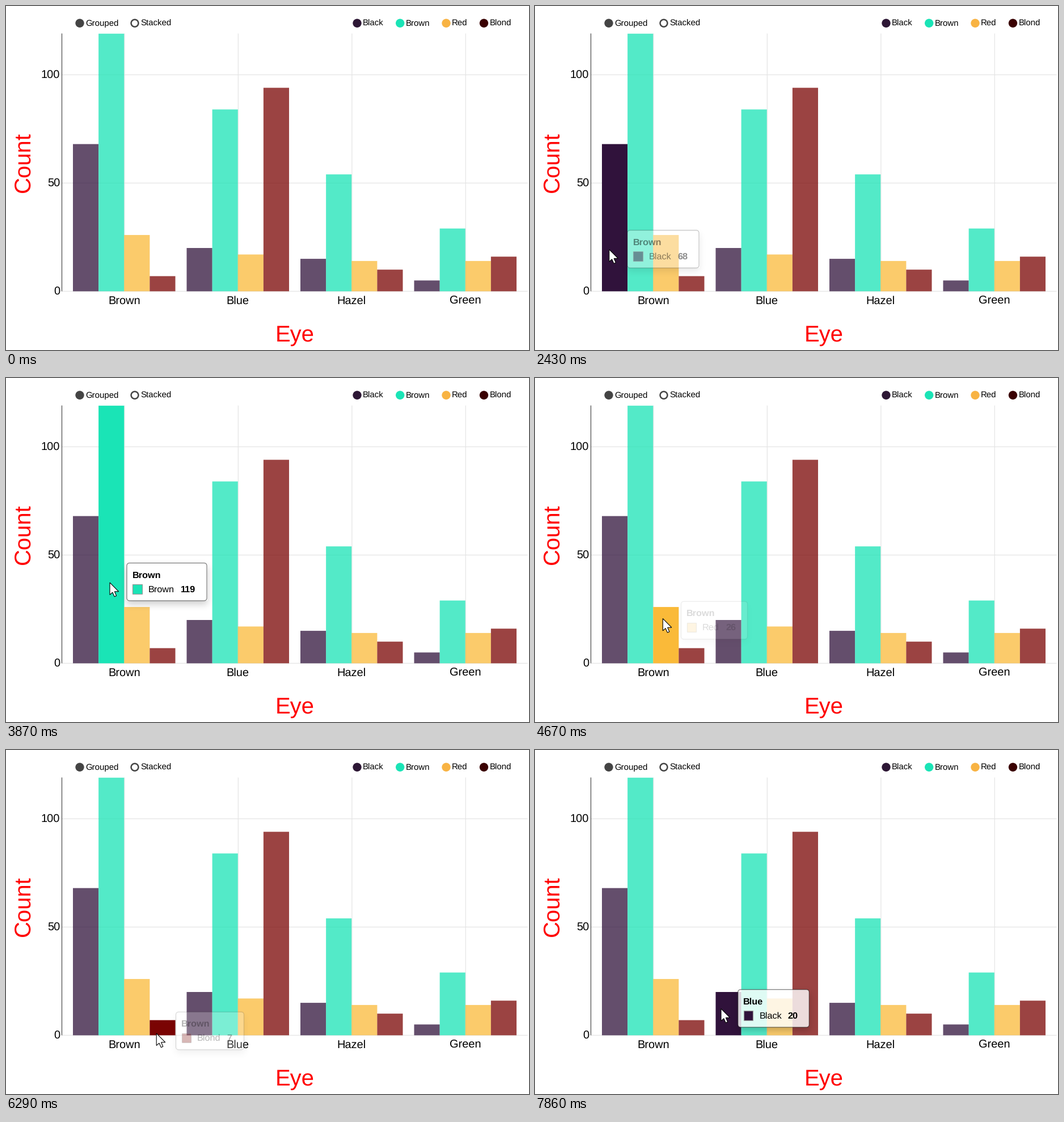
Recreate the animation shown at these times as a matplotlib script. Size 922x607 px, loop 8000 ms.

```python
import math

import matplotlib.pyplot as plt
import numpy as np
from matplotlib.animation import FuncAnimation
from matplotlib.patches import Circle, FancyBboxPatch, Polygon, Rectangle

W, H, DPI = 922, 607, 100
LOOP, INTERVAL, TICK = 8000, 40, 70
PT = 72 / DPI  # points per pixel

plt.rcParams["font.family"] = "Liberation Sans"
plt.rcParams["text.hinting"] = "none"

HAIR = ["Black", "Brown", "Red", "Blond"]
COLORS = ["#30123b", "#1ae4b6", "#faba39", "#7a0403"]
KEY_COLORS = ["#2d1735", "#1ae4b6", "#f8b343", "#3a0102"]
EYES = ["Brown", "Blue", "Hazel", "Green"]
COUNTS = [[68, 119, 26, 7], [20, 84, 17, 94], [15, 54, 14, 10], [5, 29, 14, 16]]

LEFT, RIGHT, TOP, BASE = 98.5, 919.5, 48.5, 503.4
UNIT = 3.82                      # pixels per count
GROUP_X, GROUP_STEP, BAR_W = 118, 200.5, 45.13
REST = 0.75                      # bar opacity when not hovered

fig = plt.figure(figsize=(W / DPI, H / DPI), dpi=DPI, facecolor="white")
ax = fig.add_axes([0, 0, 1, 1])
ax.set_xlim(0, W)
ax.set_ylim(H, 0)
ax.set_autoscale_on(False)
ax.axis("off")


def label(x, y, s, px, **kw):
    kw.setdefault("color", "black")
    return ax.text(x, y, s, fontsize=px * PT, va="baseline", **kw)


def line(x0, y0, x1, y1, color="#e5e5e5", z=1):
    ax.plot([x0, x1], [y0, y1], color=color, lw=1.25 * PT, zorder=z,
            solid_capstyle="butt", snap=False)


def draw_axes():
    for value in (0, 50, 100):
        y = BASE - value * UNIT
        line(LEFT, y, RIGHT, y)
        label(95, round(y) + 7, str(value), 20, ha="right")
    for i, eye in enumerate(EYES):
        x = GROUP_X + i * GROUP_STEP + 2 * BAR_W
        line(x + 0.6, TOP, x + 0.6, BASE)
        label(x, 526, eye, 20, ha="center")
    line(LEFT, TOP, LEFT, BASE, "#4d4d4d", 3)
    label(509.5, 592, "Eye", 40, ha="center", color="red")
    label(43, 275.5, "Count", 40, ha="center", color="red",
          rotation=90, rotation_mode="anchor")


def draw_bars():
    bars = {}
    for g, row in enumerate(COUNTS):
        for s, n in enumerate(row):
            x = GROUP_X + g * GROUP_STEP + s * BAR_W
            bars[g, s] = ax.add_patch(Rectangle(
                (x, BASE - n * UNIT), BAR_W, n * UNIT, fc=COLORS[s],
                alpha=REST, lw=0, zorder=2, snap=False))
    return bars


def draw_legend():
    def entry(x, name, color, fill=True):
        ax.add_patch(Circle((x, 30.3), 6.4, fc=color if fill else "white",
                            ec=color, lw=2.5 * PT, zorder=3))
        label(x + 10, 35, name, 15)

    entry(130, "Grouped", "#444444")
    entry(227, "Stacked", "#444444", fill=False)
    for x, name, color in zip((619, 694.7, 776, 842.5), HAIR, KEY_COLORS):
        entry(x, name, color)


def shadow_image(x, y, w, h, drop=6.25, sigma=6.25, pad=26):
    """Soft drop shadow around a box, cut out where the box itself lies."""
    x0, y0 = math.floor(x - pad), math.floor(y - pad)
    px = np.arange(x0, x0 + int(w) + 2 * pad + 2) + 0.5
    py = np.arange(y0, y0 + int(h) + 2 * pad + 2) + 0.5
    erf = np.vectorize(math.erf)

    def profile(p, a, b):
        k = sigma * math.sqrt(2)
        return (erf((p - a) / k) - erf((p - b) / k)) / 2

    rgba = np.zeros((len(py), len(px), 4))
    rgba[..., 3] = 0.2 * np.outer(profile(py, y + drop, y + h + drop),
                                  profile(px, x, x + w))
    inside = np.outer((py > y) & (py < y + h), (px > x) & (px < x + w))
    rgba[inside, 3] = 0
    return ax.imshow(rgba, extent=(x0, x0 + len(px), y0 + len(py), y0),
                     interpolation="nearest", aspect="auto", zorder=5)


class Tooltip:
    HEIGHT = 66.5

    def __init__(self, bar, x, y, w, value_x, show, full, hide):
        g, s = bar
        self.show, self.hide = show, hide
        self.ticks = (full - show) // TICK + 1
        self.shadow = shadow_image(x, y, w, self.HEIGHT)
        self.box = ax.add_patch(FancyBboxPatch(
            (x, y), w, self.HEIGHT, zorder=6, lw=1.25 * PT,
            boxstyle="round,pad=0,rounding_size=5"))
        swatch = ax.add_patch(Rectangle(
            (x + 10, y + 37.5), 16.5, 16.5, fc=COLORS[s], ec="#999999",
            lw=1.25 * PT, zorder=7))
        texts = [
            label(x + 9.5, y + 26, EYES[g], 16.25, weight="bold", zorder=7),
            label(x + 37.5, y + 51, HAIR[s], 16.25, zorder=7),
            label(x + value_x, y + 51, str(COUNTS[g][s]), 16.25,
                  weight="bold", zorder=7)]
        self.solid = [swatch, self.shadow] + texts

    def opacity(self, t):
        if t < self.show:
            return 0
        if t >= self.hide:
            return max(0, 1 - ((t - self.hide) // TICK + 1) / 3)
        return min(1, ((t - self.show) // TICK + 1) / self.ticks)

    def update(self, t):
        a = self.opacity(t)
        for part in self.solid:
            part.set_alpha(a)
            part.set_visible(a > 0)
        self.box.set_visible(a > 0)
        self.box.set_facecolor((1, 1, 1, 0.82 * a))
        self.box.set_edgecolor((0, 0, 0, 0.5 * a))


draw_axes()
bars = draw_bars()
draw_legend()

# bar, left, top, width, value offset, fade-in start and end, fade-out start
tooltips = [
    Tooltip((0, 0), 163, 395.7, 126, 88, 2220, 2780, 3380),
    Tooltip((0, 1), 213, 326.5, 141, 95, 3520, 3870, 4530),
    Tooltip((0, 2), 257.5, 394.3, 117, 78.5, 4670, 5090, 6080),
    Tooltip((0, 3), 299.5, 462.3, 120, 89.5, 6220, 6640, 7370),
    Tooltip((1, 0), 357.8, 422.7, 125.5, 87.5, 7510, 7860, LOOP),
]

# time at which the highlighted bar changes
HOVERS = [(0, None), (2090, (0, 0)), (3450, (0, 1)), (4600, (0, 2)),
          (6150, (0, 3)), (7440, None), (7510, (1, 0))]

# start time, from, to, share of the way after each tick
ENTER = (0, 0.4, 0.75, 1)
APPROACH = [1 - (1 - k / 7) ** 2 for k in range(8)]
GLIDE = (0.22, 0.5, 0.78, 0.94, 1)
MOVES = [
    (920, (424, 598), (268, 579), ENTER),
    (1530, (190.5, 535), (130.8, 429.6), APPROACH),
    (3310, (130.8, 429.6), (183, 361), GLIDE),
    (4460, (183, 361), (228, 428.5), GLIDE),
    (6010, (228, 428.5), (265.2, 500), GLIDE),
    (7300, (265.2, 500), (328, 456.5), GLIDE),
]
ARROW = np.array([(0, 0), (0, 21.5), (4.8, 17.2), (8.2, 24.8), (11.6, 23.3),
                  (8.4, 15.8), (15.6, 15.8)])
pointer = ax.add_patch(Polygon(ARROW, closed=True, fc="white", ec="black",
                               lw=1.1 * PT, zorder=9, joinstyle="miter"))


def latest(table, t):
    return [row for row in table if row[0] <= t][-1]


def move_pointer(t):
    pointer.set_visible(t >= MOVES[0][0])
    if t < MOVES[0][0]:
        return
    start, a, b, shares = latest(MOVES, t)
    share = shares[min((t - start) // TICK, len(shares) - 1)]
    a, b = np.array(a), np.array(b)
    pointer.set_xy(ARROW + a + (b - a) * share)


def update(i):
    t = i * INTERVAL + 30
    hovered = latest(HOVERS, t)[1]
    for key, bar in bars.items():
        bar.set_alpha(1 if key == hovered else REST)
    for tip in tooltips:
        tip.update(t)
    move_pointer(t)
    return []


anim = FuncAnimation(fig, update, frames=LOOP // INTERVAL, interval=INTERVAL,
                     init_func=lambda: update(0), repeat=True, repeat_delay=0)
plt.show()
```
